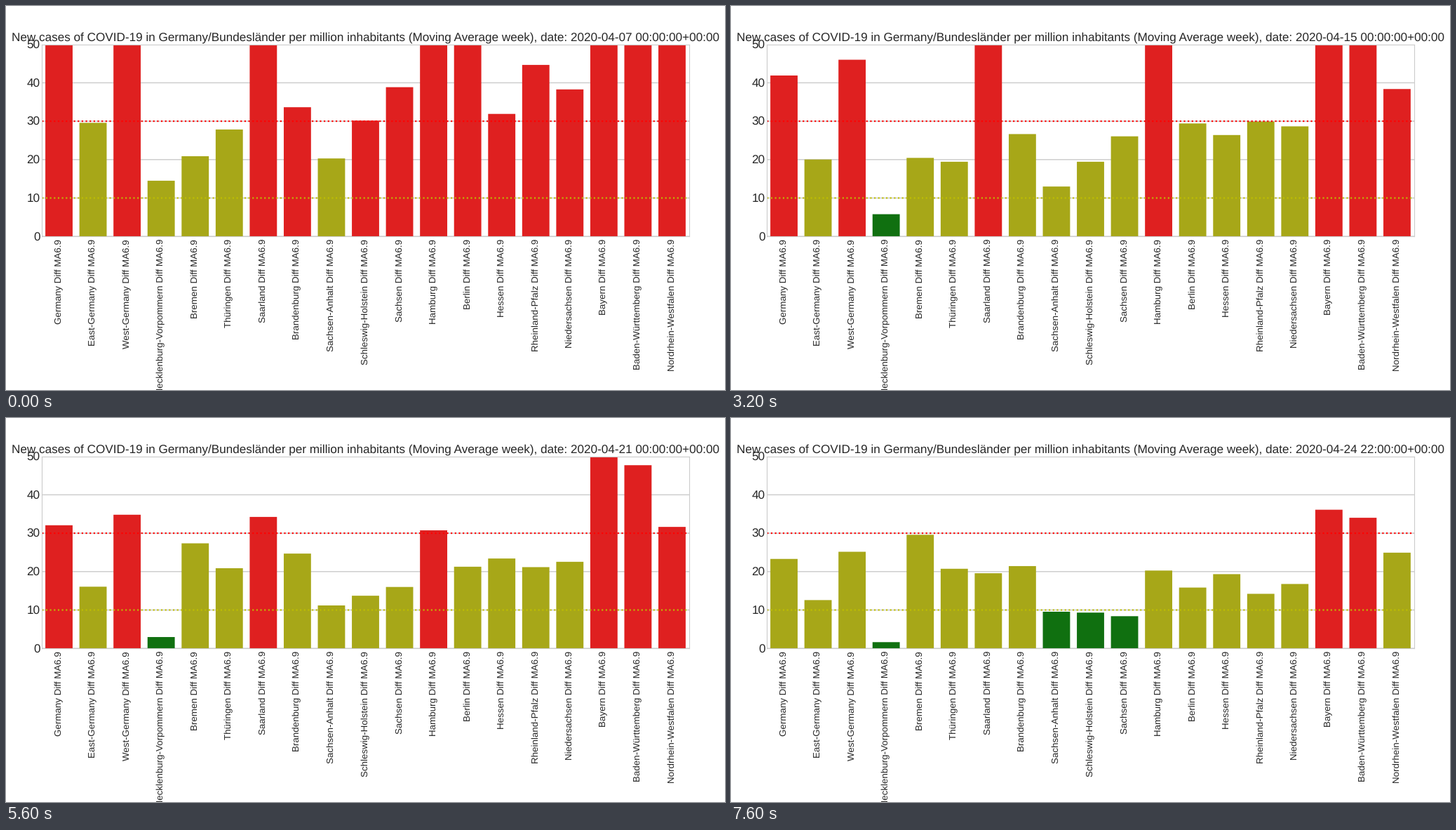
Recreate the animation shown at these times as a matplotlib script. Size 1025x547 px, loop 8 s.

```python
import colorsys

import numpy as np
import matplotlib.pyplot as plt
from matplotlib.animation import FuncAnimation
from matplotlib.colors import to_rgb

W, H, DPI = 1025, 547, 64
STEP_MS = 400
LOW, HIGH, TOP = 10, 30, 50

# Midnight readings up to the 23rd, late evening ones from the 22nd on.
STAMPS = sorted([f"{d:02d} 00" for d in range(7, 24)] +
                [f"{d:02d} 22" for d in range(22, 25)])
days = np.arange(len(STAMPS))

# National rate; each state follows it with a share (percent) that drifts
# from its first to its middle to its last value.
national = np.interp(days, [0, 5, 8, 10, 16, 19], [58, 49.6, 41.9, 35, 30.6, 23.3])
SHARES = {
    "Germany": (100, 100, 100),
    "East-Germany": (51, 47, 54),
    "West-Germany": (113, 109, 108),
    "Mecklenburg-Vorpommern": (25, 11, 7),
    "Bremen": (36, 52, 127),
    "Thüringen": (48, 46, 89),
    "Saarland": (150, 125, 84),
    "Brandenburg": (58, 65, 92),
    "Sachsen-Anhalt": (35, 30, 41),
    "Schleswig-Holstein": (52, 45, 40),
    "Sachsen": (67, 61, 36),
    "Hamburg": (190, 103, 87),
    "Berlin": (91, 65, 68),
    "Hessen": (55, 65, 83),
    "Rheinland-Pfalz": (77, 70, 61),
    "Niedersachsen": (66, 69, 72),
    "Bayern": (165, 160, 155),
    "Baden-Württemberg": (150, 151, 146),
    "Nordrhein-Westfalen": (90, 92, 107),
}
rates = np.array([national * np.interp(days, [0, 10, 19], share) / 100
                  for share in SHARES.values()])


def pt(size):
    """Points of a 15 inch wide figure."""
    return size * W / 15 / DPI


def muted(color):
    h, l, s = colorsys.rgb_to_hls(*to_rgb(color))
    return colorsys.hls_to_rgb(h, l, s * 0.75)


RED, YELLOW, GREEN = map(muted, ("red", "y", "green"))


def level_color(value):
    return RED if value > HIGH else YELLOW if value > LOW else GREEN


def title_for(day):
    date, hour = STAMPS[day].split()
    return ("New cases of COVID-19 in Germany/Bundesländer per million inhabitants "
            f"(Moving Average week), date: 2020-04-{date} {hour}:00:00+00:00")


plt.rcParams.update({
    "font.family": "Liberation Sans",
    "text.color": ".15",
    "text.hinting": "none",
    "axes.edgecolor": ".8",
    "axes.linewidth": pt(1.2),
    "axes.axisbelow": True,
})

fig, ax = plt.subplots(figsize=(W / DPI, H / DPI), dpi=DPI, facecolor="white")
fig.subplots_adjust(left=0.05, right=0.95, bottom=0.4, top=0.9)
slots = range(len(SHARES))
ax.set_xlim(-0.5, len(SHARES) - 0.5)
ax.set_ylim(0, TOP)
ax.grid(axis="y", color=".8", linewidth=pt(1.5), snap=False)
ax.set_yticks(range(0, TOP + 1, 10))
ax.set_xticks(slots, [f"{name} Diff MA6.9" for name in SHARES], rotation=90)
ax.tick_params(length=0, labelcolor=".15")
ax.tick_params(axis="x", labelsize=pt(14.15), pad=pt(4))
ax.tick_params(axis="y", labelsize=pt(18), pad=pt(3))

bars = ax.bar(slots, rates[:, 0], width=0.8, linewidth=0, snap=False)
for level, color in ((HIGH, "red"), (LOW, "y")):
    ax.axhline(level, color=color, linestyle=":", linewidth=pt(2.25), snap=False)
title = ax.set_title(title_for(0), fontsize=pt(18), pad=pt(6))


def draw(day):
    for bar, value in zip(bars, rates[:, day]):
        bar.set_height(value)
        bar.set_facecolor(level_color(value))
    title.set_text(title_for(day))
    return [*bars, title]


anim = FuncAnimation(fig, draw, frames=len(STAMPS), interval=STEP_MS,
                     repeat=True, repeat_delay=0, blit=False)
plt.show()
```
